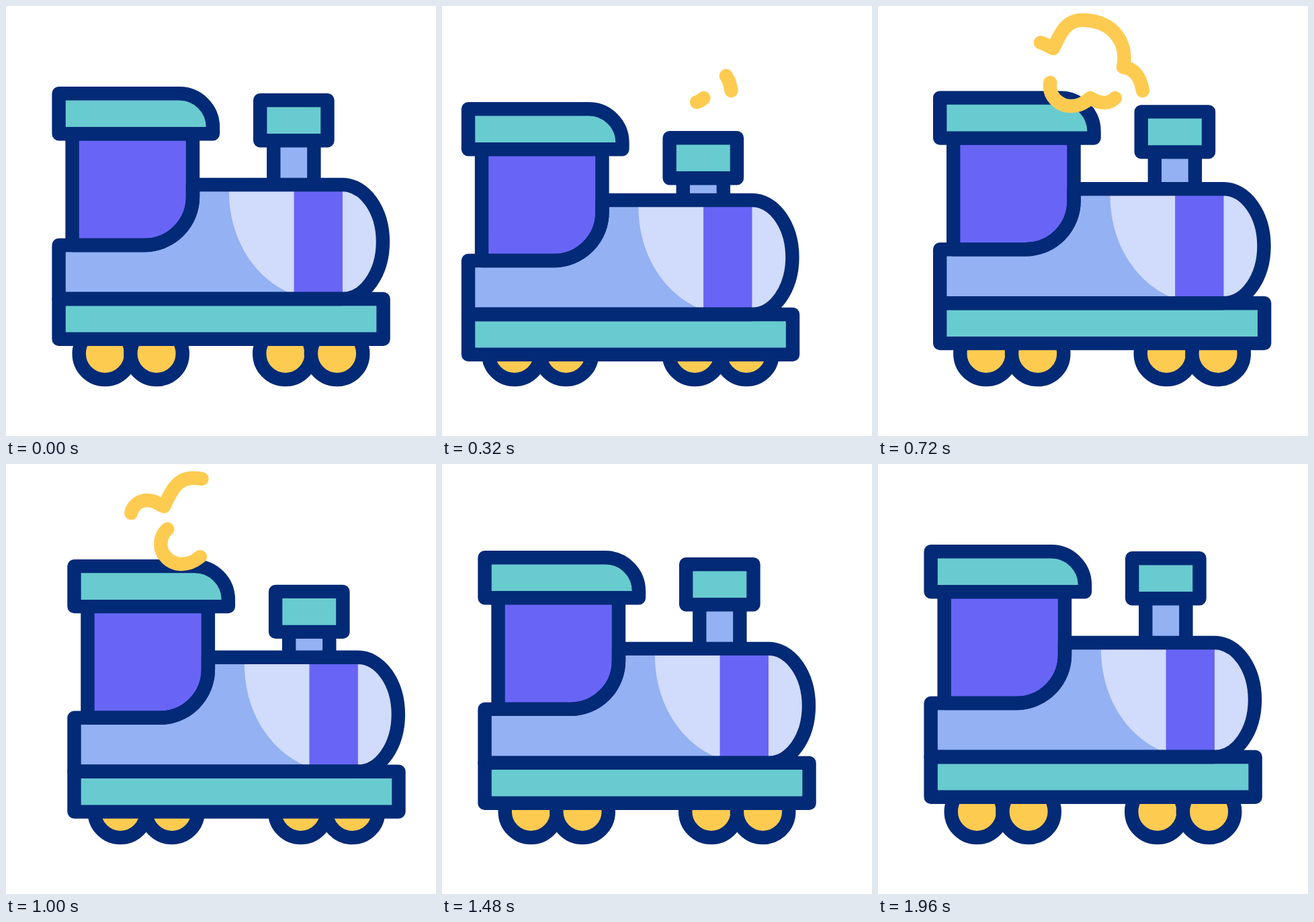
Recreate the animation shown at these times as an HTML page. Size 640 by 640 pixels, loop 2000 ms.

```html
<!DOCTYPE html>
<html lang="en">
<head>
<meta charset="utf-8">
<title>Steam train</title>
<style>
  html, body { margin: 0; height: 100%; overflow: hidden; background: #fff; }
  svg { display: block; width: 100vw; height: 100vh; }
  .line { stroke: #032a76; stroke-width: 20.4; stroke-linejoin: round; }
  .teal { fill: #68cbd0; }
  .blue { fill: #93b1f3; }
  .pale { fill: #d1dbfc; }
  .violet { fill: #6865f6; }
  .wheel { fill: #fecb51; }
  .smoke { fill: none; stroke: #fecb51; stroke-width: 20.4; stroke-linecap: round; stroke-linejoin: round; }
</style>
</head>
<body>
<svg viewBox="0 0 640 640">
  <g id="wheels" class="line wheel">
    <circle cx="147.4" cy="517.4" r="38.7"/>
    <circle cx="224.1" cy="517.4" r="38.7"/>
    <circle cx="415.9" cy="517.4" r="38.7"/>
    <circle cx="492.6" cy="517.4" r="38.7"/>
  </g>
  <g id="chimney" class="line">
    <path class="blue" d="M398.3 200V268H458.4V200"/>
    <path class="teal" d="M378.2 140.3H478.5V200.3H378.2Z"/>
  </g>
  <g id="body">
    <path class="blue" d="M78.6 436V356H206A72 72 0 0 0 278 284V266H501A60 85 0 0 1 501 436Z"/>
    <path class="pale" d="M332 266V276C332 345 368 402 420 426L440 436H501A60 85 0 0 0 501 266Z"/>
    <path class="violet" d="M428.6 266H501V436H428.6Z"/>
    <path class="line violet" d="M98.6 190V356H206A72 72 0 0 0 278 284V190Z"/>
    <path class="line" fill="none" d="M78.6 436V356H206A72 72 0 0 0 278 284V266H501A60 85 0 0 1 501 436Z"/>
    <path class="line teal" d="M78.6 436H561.6V495.8H78.6Z"/>
    <path class="line" fill="none" d="M501 436H78.6"/>
    <path class="line teal" d="M78.6 130.3H258A50 50 0 0 1 308 180.3V190.3H78.6Z"/>
  </g>
  <g id="cloud" class="smoke">
    <path id="upper" pathLength="1" d="M394 126C391 106 382 93 365 91C372 60 355 22 305 21C279 20 270 44 261 63C252 60 248 54 236 54C224 54 214 62 212 73"/>
    <path id="lower" pathLength="1" d="M353 137C345 145 332 147 316 137C304 147 296 149 287 149C270 149 256 135 256 120C256 110 260 102 266 97"/>
  </g>
</svg>
<script>
  const LOOP = 2000;
  const el = id => document.getElementById(id);
  const [wheels, chimney, body, cloud, upper, lower] =
    ['wheels', 'chimney', 'body', 'cloud', 'upper', 'lower'].map(el);

  // [time, value] keys, eased in and out between neighbours
  const sway = [[0, 0], [400, -44], [880, 33.4], [1320, -23.3], [1720, 0]];
  const squat = [[0, 0], [320, 23], [645, 0], [865, 22.8], [1940, 0]];
  const press = [[0, 0], [320, 33], [610, 0], [900, 33], [1300, 0]];
  const grow = [[200, 0], [880, 1]];
  const fadeUpper = [[725, 0], [1268, 1]];
  const fadeLower = [[760, 0], [1440, 1]];

  function at(keys, t) {
    if (t <= keys[0][0]) return keys[0][1];
    for (let i = 1; i < keys.length; i++) {
      const [t0, a] = keys[i - 1], [t1, b] = keys[i];
      if (t < t1) {
        const s = (t - t0) / (t1 - t0);
        return a + (b - a) * s * s * (3 - 2 * s);
      }
    }
    return keys[keys.length - 1][1];
  }

  const move = (node, x, y) => node.setAttribute('transform', `translate(${x} ${y})`);

  function trim(path, from, to) {
    const visible = to - from > 0.001;
    path.style.display = visible ? '' : 'none';
    if (!visible) return;
    path.setAttribute('stroke-dasharray', `${to - from} 3`);
    path.setAttribute('stroke-dashoffset', -from);
  }

  function draw(now) {
    const t = now % LOOP;
    const x = at(sway, t), y = at(squat, t), end = at(grow, t);
    move(wheels, x, 0);
    move(body, x, y);
    move(chimney, x, y + at(press, t));
    move(cloud, 0.0915 * (720 - t), 0);
    trim(upper, at(fadeUpper, t), end);
    trim(lower, at(fadeLower, t), end);
  }

  const start = performance.now();
  function tick() {
    draw(performance.now() - start);
    requestAnimationFrame(tick);
  }
  tick();
</script>
</body>
</html>
```
